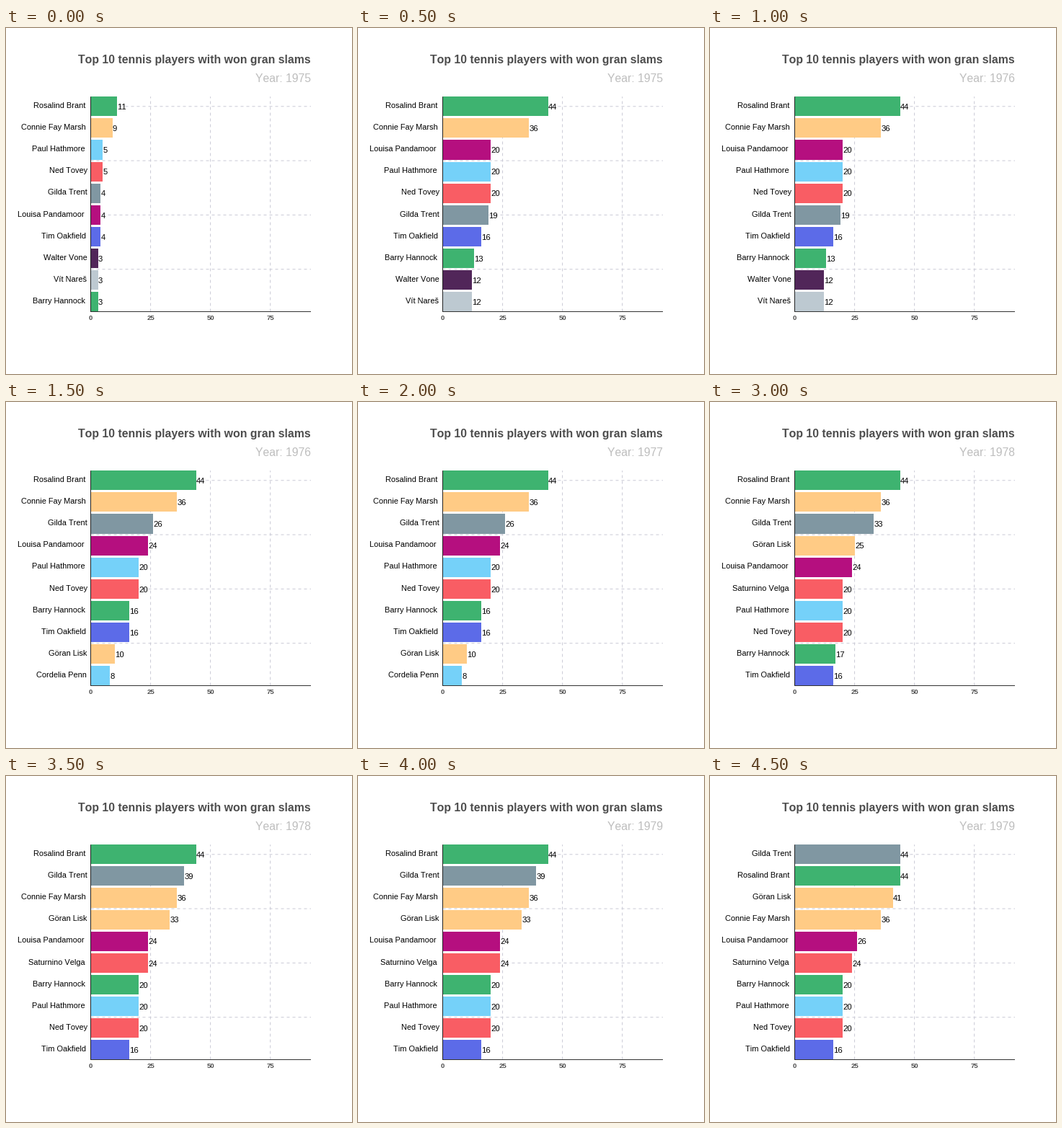
A matplotlib script for the animation above (5000 ms loop, 480x480 px).

```python
import matplotlib.pyplot as plt
from matplotlib.animation import FuncAnimation
from matplotlib.patches import Rectangle

SIZE, DPI = 480, 100
AXIS, RIGHT, BASE = 117.5, 423, 393.5
X0, UNIT = 117.7, 3.322
TOP, PITCH, BAR = 95.2, 30.12, 27.15

GREEN, ORANGE, BLUE, RED = "#3eb370", "#ffcb85", "#75d1f9", "#f95d64"

# key: (name, bar colour, right edge of the label)
PLAYERS = {
    "B": ("Rosalind Brant", GREEN, 110.5),
    "M": ("Connie Fay Marsh", ORANGE, 110.5),
    "H": ("Paul Hathmore", BLUE, 109.5),
    "T": ("Ned Tovey", RED, 113),
    "G": ("Gilda Trent", "#8097a2", 112.5),
    "P": ("Louisa Pandamoor", "#b50f7f", 108.5),
    "O": ("Tim Oakfield", "#5c6be8", 111),
    "W": ("Walter Vone", "#512659", 112.5),
    "N": ("Vít Nareš", "#bdc9d1", 112),
    "C": ("Barry Hannock", GREEN, 110),
    "L": ("Göran Lisk", ORANGE, 112.5),
    "D": ("Cordelia Penn", BLUE, 111.5),
    "V": ("Saturnino Velga", RED, 110),
}

# ranking order and totals, best first
STANDINGS = [
    ("BMHTGPOWNC", (11, 9, 5, 5, 4, 4, 4, 3, 3, 3)),
    ("BMPHTGOCWN", (44, 36, 20, 20, 20, 19, 16, 13, 12, 12)),
    ("BMGPHTCOLD", (44, 36, 26, 24, 20, 20, 16, 16, 10, 8)),
    ("BMGLPVHTCO", (44, 36, 33, 25, 24, 20, 20, 20, 17, 16)),
    ("BGMLPVCHTO", (44, 39, 36, 33, 24, 24, 20, 20, 20, 16)),
    ("GBLMPVCHTO", (44, 44, 41, 36, 26, 24, 20, 20, 20, 16)),
]

plt.rcParams["font.family"] = "Liberation Sans"
plt.rcParams["text.kerning_factor"] = 6  # no pair kerning
fig = plt.figure(figsize=(SIZE / DPI, SIZE / DPI), dpi=DPI, facecolor="white")
ax = fig.add_axes([0, 0, 1, 1])
ax.set(xlim=(0, SIZE), ylim=(SIZE, 0))
ax.axis("off")


def pt(px):
    return px * 72 / DPI


def text(x, y, s, px, **kw):
    return ax.text(x, y, s, fontsize=pt(px), va="baseline", zorder=4, **kw)


def line(xs, ys, color, z, dashes=None):
    (ln,) = ax.plot(xs, ys, color=color, lw=pt(1), zorder=z, snap=False,
                    solid_capstyle="butt", dash_capstyle="butt")
    if dashes:
        ln.set_dashes(dashes)


def grid(xs, ys):
    line(xs, ys, "#cacad6", 1, (4, 4))


for i in range(4):
    y = TOP + BAR / 2 + 2.5 * PITCH * i
    grid((AXIS, RIGHT), (y, y))
    x = AXIS + 25 * UNIT * i
    if i:
        grid((x, x), (BASE, TOP))
    text(x, 405.2, str(25 * i), 9.5, ha="center", weight="bold",
         color="#4d4d4d")

line((AXIS, AXIS), (BASE + 0.5, TOP), "#222222", 3)
line((AXIS - 0.5, RIGHT), (BASE, BASE), "#333333", 3)

text(RIGHT, 49, "Top 10 tennis players with won gran slams", 15.85,
     ha="right", weight="bold", color="#4d4d4d")
year = text(RIGHT, 75, "", 15.7, ha="right", color="#bebebe")

rows = []
for i in range(10):
    top = TOP + PITCH * i
    bar = ax.add_patch(Rectangle((X0, top), 0, BAR, lw=0, zorder=2))
    label = text(0, top + 15.8, "", 11, ha="right", color="black")
    value = text(0, top + 17.8, "", 11.3, ha="left", color="black")
    rows.append((bar, label, value))


def update(k):
    year.set_text(f"Year: {1975 + k // 2}")
    order, totals = STANDINGS[(k + 1) // 2]
    for (bar, label, value), key, n in zip(rows, order, totals):
        name, color, right = PLAYERS[key]
        bar.set_width(n * UNIT)
        bar.set_facecolor(color)
        label.set_text(name)
        label.set_x(right)
        value.set_text(str(n))
        value.set_x(X0 + n * UNIT + 0.3)
    return [year] + [a for row in rows for a in row]


anim = FuncAnimation(fig, update, frames=10, interval=500,
                     init_func=lambda: update(0), repeat=True, repeat_delay=0)
plt.show()
```
